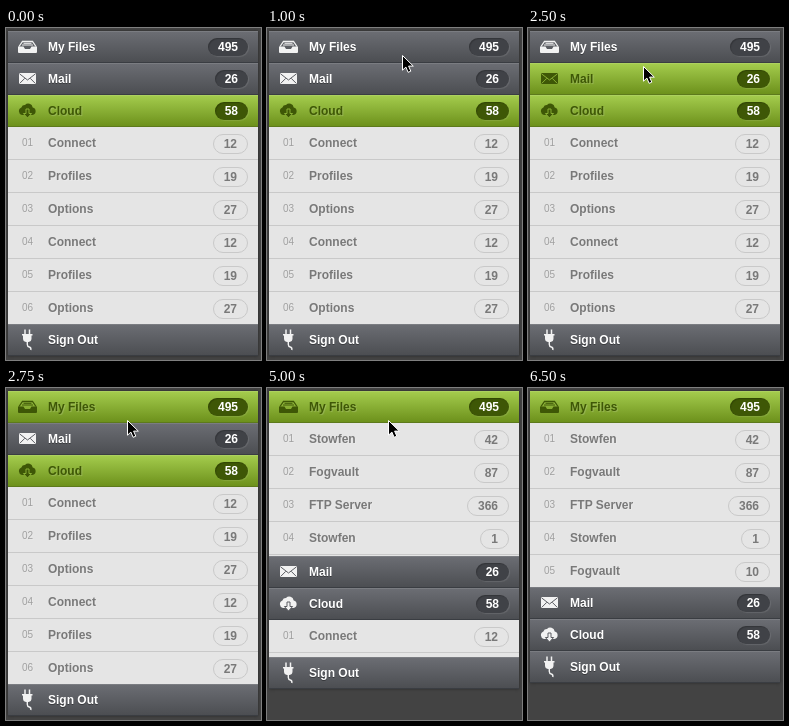
These frames come from a looping animation (255 px wide and 332 px high, 7.5 s). An HTML page:

```html
<!DOCTYPE html>
<html lang="en">
<head>
<meta charset="utf-8">
<title>Accordion menu</title>
<style>
  html, body { margin: 0; width: 100%; height: 100%; overflow: hidden; background: #434343; }
  body { position: relative; font: bold 12px/32px "Liberation Sans", Arial, sans-serif; }
  #menu { position: absolute; left: 2px; top: 3px; width: 250px; box-shadow: 0 0 3px rgba(0,0,0,.4); }
  .head, .item { position: relative; box-sizing: border-box; padding-left: 40px; white-space: nowrap; }
  .head {
    --mid: #5b5d62;
    height: 32px; color: #fff; text-shadow: 0 1px 0 rgba(0,0,0,.35);
    background: linear-gradient(#6c6e74, #4b4d51);
    box-shadow: inset 0 1px 0 rgba(255,255,255,.1), inset 0 -1px 0 #3a3d42;
  }
  .head.on {
    --mid: #88ae34;
    color: #3e5706; text-shadow: 1px 1px 1px rgba(255,255,255,.2);
    background: linear-gradient(#a5cd4e, #6b8f1a);
    box-shadow: inset 0 1px 0 rgba(255,255,255,.1), inset 0 -1px 0 #5d7a1c;
  }
  .head svg { position: absolute; left: 8px; top: 0; color: #f2f2f2; }
  .head.on svg { color: #3e5706; }
  .badge {
    position: absolute; right: 10px; top: 7px; padding: 0 10px; border-radius: 10px;
    line-height: 18px; color: #fff; background: #404247; text-shadow: none;
    box-shadow: inset 1px 1px 1px rgba(0,0,0,.2), 1px 1px 1px rgba(255,255,255,.1);
  }
  .on .badge { background: #3e5706; }
  .panel { overflow: hidden; background: #e5e5e5; }
  .item {
    height: 33px; color: #797979; border-bottom: 1px solid #c9c9c9;
    text-shadow: 1px 1px 0 rgba(255,255,255,.2);
  }
  .item .badge { color: #797979; background: none; border: 1px solid #c9c9c9; box-shadow: none; }
  .num { position: absolute; left: 14px; font-size: 10px; font-weight: normal; color: #a0a0a0; }
  #cursor { position: absolute; left: 0; top: 0; }
</style>
</head>
<body>
<div id="menu"></div>
<svg id="cursor" width="14" height="20">
  <path d="M.5 .5V15.2L3.9 12.1 6.1 17.3 8.8 16.2 6.6 11.1H11.3Z"
        fill="#000" stroke="#fff" stroke-linejoin="round"/>
</svg>
<script>
const icons = {
  tray: `<path d="M3 15.5 6.5 10.5h10L20 15.5" fill="none" stroke="currentColor" stroke-width="1.3"/>
    <path d="M6 14h11M7.5 12.3h8" stroke="currentColor"/>
    <path d="M2 15.5h5.5l1.5 2.5h5l1.500-2.500H21V21q0 1-1 1H3q-1 0-1-1z" fill="currentColor"/>`,
  mail: `<rect x="3" y="10" width="17" height="11" rx="1" fill="currentColor"/>
    <path d="M3.500 10.800 11.500 17 19.500 10.800M3.800 20.300 8.800 15.300M19.200 20.300 14.200 15.300"
      fill="none" stroke="var(--mid)"/>`,
  cloud: `<path d="M6 20a4 4 0 0 1-.6-7.600A3.600 3.600 0 0 1 9 10a4.500 4.500 0 0 1 7.700 2.400A3.900 3.900 0 0 1 16.500 20z"
      fill="currentColor"/>
    <path d="M10 14h3v4.500h2.600L11.500 23 7.400 18.500H10z" fill="currentColor" stroke="var(--mid)"/>`,
  plug: `<path d="M9 5.500v5M13.500 5.500v5" stroke="currentColor" stroke-width="1.500"/>
    <path d="M6 10h10.500v1.500H15.500v3q0 3-3 3.500h-2.500q-3-.5-3-3.500v-3H6z" fill="currentColor"/>
    <path d="M11.300 18v2.500q0 2 2 2.500t1.500 3" fill="none" stroke="currentColor" stroke-width="1.400"/>`
};

const sections = [
  { name: "My Files", icon: "tray", count: 495, items:
    [["Stowfen", 42], ["Fogvault", 87], ["FTP Server", 366], ["Stowfen", 1], ["Fogvault", 10]] },
  { name: "Mail", icon: "mail", count: 26 },
  { name: "Cloud", icon: "cloud", count: 58, items:
    [["Connect", 12], ["Profiles", 19], ["Options", 27], ["Connect", 12], ["Profiles", 19], ["Options", 27]] },
  { name: "Sign Out", icon: "plug" }
];

const badge = n => n === undefined ? "" : `<span class="badge">${n}</span>`;
const item = ([name, n], i) =>
  `<div class="item"><span class="num">0${i + 1}</span>${name}${badge(n)}</div>`;
const section = s =>
  `<div class="head"><svg width="24" height="32">${icons[s.icon]}</svg>${s.name}${badge(s.count)}</div>` +
  (s.items ? `<div class="panel">${s.items.map(item).join("")}</div>` : "");

const menu = document.getElementById("menu");
menu.innerHTML = sections.map(section).join("");
const heads = menu.querySelectorAll(".head");
const panels = menu.querySelectorAll(".panel");
const cursor = document.getElementById("cursor");

const FILES = 0, MAIL = 1, CLOUD = 2, LOOP = 7500;

// start time, pointer position, highlighted heads, panel heights
const steps = [
  [0,    null,       [CLOUD],        [0, 197]],
  [750,  [189, 31],  [CLOUD],        [0, 197]],
  [1000, [135, 27],  [CLOUD],        [0, 197]],
  [2000, [109, 45],  [MAIL, CLOUD],  [0, 197]],
  [2250, [109, 49],  [MAIL, CLOUD],  [0, 197]],
  [2500, [115, 38],  [MAIL, CLOUD],  [0, 197]],
  [2750, [121, 32],  [FILES, CLOUD], [0, 197]],
  [4750, [121, 32],  [FILES],        [3, 195]],
  [5000, [121, 32],  [FILES],        [133, 37]],
  [5250, [121, 32],  [FILES],        [164, 0]],
  [6500, null,       [FILES],        [164, 0]]
];

function show([, pos, lit, sizes]) {
  cursor.style.display = pos ? "block" : "none";
  if (pos) cursor.style.transform = `translate(${pos[0]}px, ${pos[1]}px)`;
  heads.forEach((h, i) => h.classList.toggle("on", lit.includes(i)));
  panels.forEach((p, i) => p.style.height = sizes[i] + "px");
}

const start = performance.now();
let current;
function tick() {
  const t = (performance.now() - start) % LOOP;
  const step = steps.findLast(s => s[0] <= t);
  if (step !== current) show(current = step);
  requestAnimationFrame(tick);
}
tick();
</script>
</body>
</html>
```
